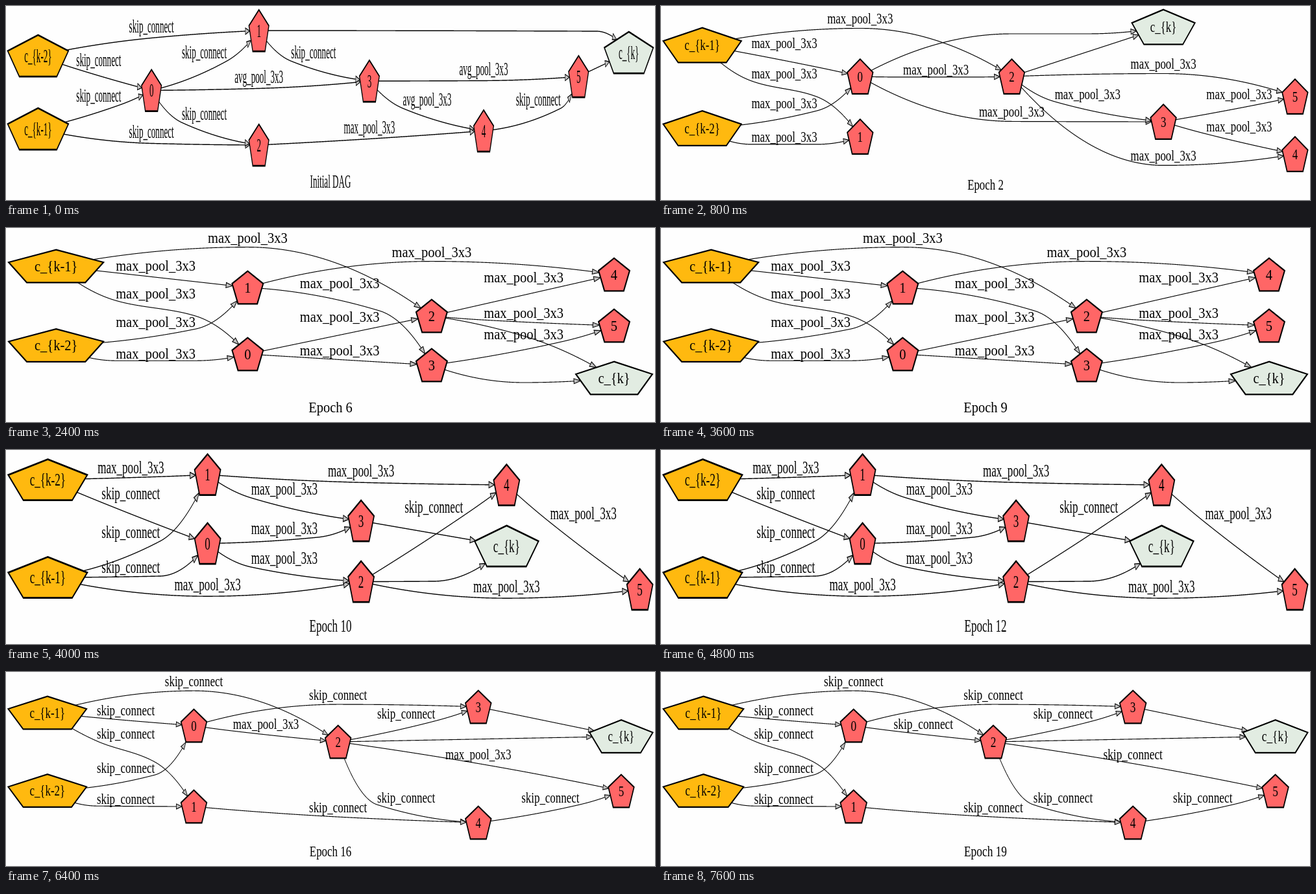
These frames come from a looping animation (1000 by 300 pixels, 8000 ms). An HTML page with a canvas:

```html
<!DOCTYPE html>
<html lang="en">
<head>
<meta charset="utf-8">
<title>Cell graph by epoch</title>
<style>
  html, body { margin: 0; width: 100%; height: 100%; overflow: hidden; background: #fefefe; }
  canvas { display: block; width: 1000px; height: 300px; }
</style>
</head>
<body>
<canvas id="stage" width="1000" height="300"></canvas>
<script>
const ctx = document.getElementById('stage').getContext('2d');
const WIDTH = 1000, HEIGHT = 300, STEP = 400, STEPS = 20;
const UNIT = 20, GAP = 0.93, PAD = 0.2;
const FONT = UNIT + 'px "Liberation Serif", "Times New Roman", serif';
const SKIP = 'skip_connect', MAX = 'max_pool_3x3', AVG = 'avg_pool_3x3', NONE = '';
const IN1 = 'c_{k-1}', IN2 = 'c_{k-2}', OUT = 'c_{k}';

// Half widths are in font units
const INPUT = { half: 3.57, fill: '#ffb90f' };
const INNER = { half: 1.17, fill: '#ff6666' };
const OUTPUT = { half: 2.88, fill: '#e2ece2' };
const kindOf = name => name === OUT ? OUTPUT : name[0] === 'c' ? INPUT : INNER;
const clamp = (v, lo, hi) => Math.min(hi, Math.max(lo, v));

ctx.font = FONT;
const widthOf = label => ctx.measureText(label).width / UNIT;

// Ranks run left to right, nodes on even ones. A rank is as wide as its widest node or label;
// the sum of all ranks sets the horizontal scale.
// nodes: name -> [rank, y]; edges: [from, to, label, label y]
function graph(fh, nodes, edges) {
  const last = Math.max(...Object.values(nodes).map(([rank]) => rank));
  const wide = Array(last + 1).fill(0);
  const widen = (rank, w) => { wide[rank] = Math.max(wide[rank], w); };
  for (const name in nodes) widen(nodes[name][0], 2 * kindOf(name).half);

  const links = edges.map(([from, to, label, y]) => {
    const start = nodes[from][0], end = nodes[to][0], rank = (start + end) / 2;
    if (label) widen(rank, widthOf(label));
    return { from, to, label, y, rank, end, long: end - start > 2 };
  });

  const centres = [PAD + wide[0] / 2];
  for (let r = 1; r <= last; r++)
    centres[r] = centres[r - 1] + (wide[r - 1] + wide[r]) / 2 + GAP;
  const fw = WIDTH / (centres[last] + wide[last] / 2 + PAD);
  const xs = centres.map(c => c * fw);
  const at = name => [xs[nodes[name][0]], nodes[name][1]];
  return { fw, fh, xs, at, links, names: Object.keys(nodes) };
}

const initial = graph(28.4, {
  [IN2]: [0, 77], [IN1]: [0, 190], 0: [2, 130.5], 1: [4, 38], 2: [4, 215],
  3: [6, 116], 4: [8, 193], 5: [10, 109], [OUT]: [12, 72]
}, [
  [IN2, 1, SKIP, 31], [IN2, 0, SKIP, 83], [IN1, 0, SKIP, 138], [IN1, 2, SKIP, 194],
  [0, 1, SKIP, 71], [0, 3, AVG, 109], [0, 2, SKIP, 166], [1, OUT, NONE, 39], [1, 3, SKIP, 71],
  [3, 5, AVG, 97], [3, 4, AVG, 144], [2, 4, MAX, 187], [4, 5, SKIP, 144], [5, OUT, NONE]
]);

const early = graph(23.8, {
  [IN1]: [0, 60.5], [IN2]: [0, 189], 0: [2, 109], 1: [2, 202], 2: [4, 109],
  3: [6, 179], 4: [8, 229], 5: [8, 140], [OUT]: [6, 32.5]
}, [
  [IN1, 2, MAX, 19], [IN1, 0, MAX, 57], [IN1, 1, MAX, 104], [IN2, 0, MAX, 150],
  [IN2, 1, MAX, 202], [0, OUT, NONE, 43], [0, 2, MAX, 98], [0, 3, MAX, 163], [2, 5, MAX, 89],
  [2, 3, MAX, 136], [2, 4, MAX, 231], [3, 5, MAX, 136], [3, 4, MAX, 186], [2, OUT, NONE]
]);

const growing = graph(21.5, {
  [IN1]: [0, 61], [IN2]: [0, 176], 0: [2, 80.5], 1: [2, 200.5], 2: [4, 100],
  3: [6, 101], 4: [6, 237], 5: [8, 144], [OUT]: [8, 62]
}, [
  [IN1, 2, MAX, 14], [IN1, 0, MAX, 57], [IN1, 1, MAX, 91], [IN2, 0, MAX, 142],
  [IN2, 1, MAX, 188], [0, 3, MAX, 34], [0, 2, MAX, 76], [2, 3, MAX, 89], [2, 5, MAX, 148],
  [1, 4, MAX, 206], [2, 4, MAX, 194], [2, OUT, NONE, 57], [3, OUT, NONE], [3, 5, MAX, 105]
]);

const pooled = first => graph(22.4, {
  [IN1]: [0, 59], [IN2]: [0, 181.5], 1: [2, 92], 0: [2, 195], 2: [4, 136],
  3: [4, 212], 4: [6, 72], 5: [6, 151], [OUT]: [6, 232]
}, [
  [IN1, 2, MAX, 15], [IN1, 1, first, 58], [IN1, 0, MAX, 101], [IN2, 1, MAX, 145],
  [IN2, 0, MAX, 194], [1, 4, MAX, 37], [0, 2, MAX, 137], [1, 3, MAX, 85], [0, 3, MAX, 189],
  [2, 4, MAX, 76], [2, 5, MAX, 131], [3, 5, MAX, 164], [2, OUT, NONE, 167], [3, OUT, NONE, 239]
]);

const mixed = graph(28, {
  [IN2]: [0, 46], [IN1]: [0, 197], 1: [2, 38], 0: [2, 144.5], 3: [4, 109.5],
  2: [4, 203.5], 4: [6, 54], 5: [8, 215.5], [OUT]: [6, 148.5]
}, [
  [IN2, 1, MAX, 27], [IN2, 0, SKIP, 67], [IN1, 1, SKIP, 127], [IN1, 0, SKIP, 181],
  [IN1, 2, MAX, 208], [1, 4, MAX, 32], [1, 3, MAX, 60], [0, 3, MAX, 121], [0, 2, MAX, 167],
  [2, 4, SKIP, 88], [3, OUT, NONE], [2, OUT, NONE, 203], [2, 5, MAX, 211], [4, 5, MAX, 98]
]);

const skipping = op => graph(22.4, {
  [IN1]: [0, 63], [IN2]: [0, 183.5], 0: [2, 83], 1: [2, 208], 2: [4, 108],
  3: [6, 54], 4: [6, 233], 5: [8, 184], [OUT]: [8, 99.5]
}, [
  [IN1, 2, SKIP, 14.5], [IN1, 0, SKIP, 59.5], [IN1, 1, SKIP, 95.5], [IN2, 0, SKIP, 148],
  [IN2, 1, SKIP, 196], [0, 3, SKIP, 35.5], [0, 2, op, 80], [2, 3, SKIP, 64.5],
  [2, OUT, NONE], [2, 5, op, 127], [2, 4, SKIP, 194], [1, 4, SKIP, 209.5],
  [3, OUT, NONE], [4, 5, SKIP, 194]
]);

const allMax = pooled(MAX), oneSkip = pooled(SKIP);
const partSkip = skipping(MAX), allSkip = skipping(SKIP);
// First step at which each graph appears
const schedule = [
  [0, initial], [1, early], [3, growing], [5, allMax], [7, oneSkip],
  [9, allMax], [10, mixed], [13, partSkip], [18, allSkip]
];

// Limits for an edge: long ones run just under their label, short ones
// squeeze between its lower corners and the next label below
function gatesOf(g, { label, y, rank, end, long }) {
  const x = g.xs[rank], gate = (x, lo, hi = lo) => ({ x, lo, hi });
  if (y === undefined) return [];
  if (!label) return [gate(x, y), gate(g.xs[end - 1], y)];
  if (long) return [gate(x, y + 0.65 * g.fh)];
  const below = g.links.filter(l => l.label && l.rank === rank && l.y > y).map(l => l.y);
  const half = widthOf(label) * g.fw / 2;
  const lo = y + 0.5 * g.fh, hi = Math.min(...below) - 0.4 * g.fh;
  return [gate(x - half, lo, hi), gate(x + half, lo, hi)];
}

// Bend the straight line at the most violated gate until all are met
function taut(pts, gates) {
  for (;;) {
    let bend = null, worst = 0.5;
    for (const { x, lo, hi } of gates) {
      const i = Math.max(1, pts.findIndex(p => p[0] >= x));
      const [[x0, y0], [x1, y1]] = [pts[i - 1], pts[i]];
      const y = y0 + (y1 - y0) * (x - x0) / (x1 - x0), fixed = clamp(y, lo, hi);
      if (Math.abs(fixed - y) > worst) {
        worst = Math.abs(fixed - y);
        bend = [x, fixed];
      }
    }
    if (!bend) return pts;
    pts = [...pts, bend].sort((a, b) => a[0] - b[0]);
  }
}

// Samples of a smooth y(x) through the points, without overshoot
function smooth(pts) {
  const n = pts.length - 1, out = [];
  const slope = pts.slice(1).map(([x, y], i) => (y - pts[i][1]) / (x - pts[i][0]));
  const m = pts.map((p, i) => {
    const a = slope[i - 1], b = slope[i];
    return a * b > 0 ? 2 * a * b / (a + b) : 0;
  });
  m[0] = n > 1 ? 2 * slope[0] - m[1] : slope[0];
  m[n] = n > 1 ? 2 * slope[n - 1] - m[n - 1] : slope[0];
  for (let i = 0; i < n; i++) {
    const [x0, y0] = pts[i], [x1, y1] = pts[i + 1], w = x1 - x0, count = Math.ceil(w * 4);
    for (let k = 0; k < count; k++) {
      const t = k / count, u = 1 - t;
      const y = y0 * u * u * (1 + 2 * t) + y1 * t * t * (3 - 2 * t)
        + w * t * u * (m[i] * u - m[i + 1] * t);
      out.push([x0 + w * t, y]);
    }
  }
  return out;
}

function polygon(g, name) {
  const [x, y] = g.at(name), w = kindOf(name).half * g.fw, h = 1.13 * g.fh;
  return [[0, -1], [1, -0.236], [0.618, 1], [-0.618, 1], [-1, -0.236]]
    .map(([px, py]) => [x + px * w, y + py * h]);
}

function trace(pts, closed) {
  ctx.beginPath();
  pts.forEach(p => ctx.lineTo(...p));
  if (closed) ctx.closePath();
}

function scaled(g, paint) {
  ctx.save();
  ctx.scale(g.fw / UNIT, g.fh / UNIT);
  paint();
  ctx.restore();
}

function outline(g, width) {
  scaled(g, () => {
    ctx.lineWidth = width;
    ctx.stroke();
  });
}

function text(g, str, x, y) {
  const sx = g.fw / UNIT, sy = g.fh / UNIT;
  scaled(g, () => {
    ctx.fillStyle = '#000';
    ctx.fillText(str, x / sx, (y + 0.335 * g.fh) / sy);
  });
}

function arrow(g, [x, y], [bx, by]) {
  const sx = g.fw / UNIT, sy = g.fh / UNIT;
  const angle = Math.atan2((y - by) / sy, (x - bx) / sx);
  scaled(g, () => {
    ctx.translate(x / sx, y / sy);
    ctx.rotate(angle);
    trace([[0, 0], [-10, -3.5], [-10, 3.5]], true);
    ctx.fillStyle = '#c0c0c0';
    ctx.fill();
    ctx.lineWidth = 1;
    ctx.stroke();
  });
}

function edge(g, link) {
  let line = smooth(taut([g.at(link.from), g.at(link.to)], gatesOf(g, link)));
  for (const name of [link.from, link.to]) {
    trace(polygon(g, name), true);
    line = line.filter(p => !ctx.isPointInPath(...p));
  }
  const tip = line[line.length - 1];
  const reach = ([x, y]) => Math.hypot((tip[0] - x) / g.fw, (tip[1] - y) / g.fh) * UNIT;
  const shaft = line.filter(p => reach(p) >= 10);
  trace(shaft);
  outline(g, 1);
  arrow(g, tip, shaft[shaft.length - 1]);
  if (link.label) text(g, link.label, g.xs[link.rank], link.y);
}

function node(g, name) {
  trace(polygon(g, name), true);
  ctx.fillStyle = kindOf(name).fill;
  ctx.fill();
  outline(g, 2);
  text(g, name, ...g.at(name));
}

function draw(step) {
  const g = schedule.filter(([from]) => from <= step).pop()[1];
  ctx.fillStyle = '#fefefe';
  ctx.fillRect(0, 0, WIDTH, HEIGHT);
  ctx.strokeStyle = '#000';
  ctx.font = FONT;
  ctx.textAlign = 'center';
  g.links.forEach(link => edge(g, link));
  g.names.forEach(name => node(g, name));
  text(g, step ? 'Epoch ' + step : 'Initial DAG', WIDTH / 2, HEIGHT - g.fh);
}

const start = performance.now();
let shown = -1;
function tick() {
  const step = Math.floor((performance.now() - start) / STEP) % STEPS;
  if (step !== shown) draw(shown = step);
  requestAnimationFrame(tick);
}
tick();
</script>
</body>
</html>
```
